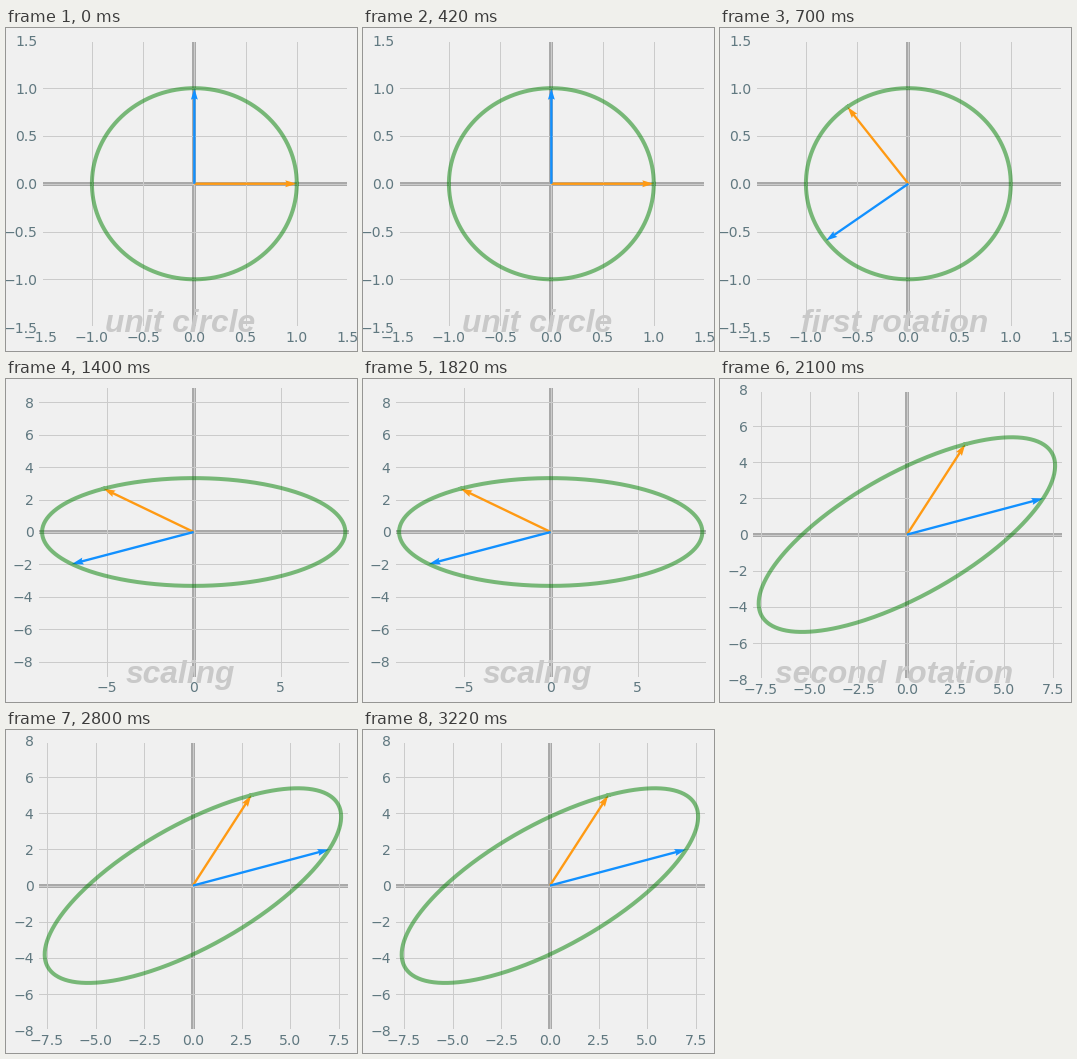
A matplotlib script for the animation above (3500 ms loop, 351x323 px).

```python
import numpy as np
import matplotlib.pyplot as plt
from matplotlib.animation import FuncAnimation
from matplotlib.ticker import MultipleLocator

W, H, DPI = 351, 323, 72
BG = "#f0f0f0"
ORANGE, BLUE = "#FF9A13", "#1190FF"

plt.rcParams.update({
    "font.family": "DejaVu Sans",
    "font.size": 14,
    "figure.facecolor": BG,
    "axes.facecolor": BG,
    "axes.edgecolor": BG,
    "axes.linewidth": 3,
    "axes.grid": True,
    "axes.axisbelow": True,
    "grid.color": "#cbcbcb",
    "grid.linewidth": 1,
    "lines.linewidth": 4,
    "xtick.major.size": 0,
    "ytick.major.size": 0,
    "xtick.labelcolor": "#607880",
    "ytick.labelcolor": "#607880",
})

# Singular value decomposition of A with a fixed choice of signs
A = np.array([[3, 7], [5, 2]])
U, sigma, _ = np.linalg.svd(A)
U = U * np.array([-np.sign(U[0, 0]), np.sign(U[1, 1])])
D = np.diag(sigma)
Vt = np.linalg.inv(D) @ U.T @ A

# Views: limit, x step, y step, box in pixels (left, top, right, bottom)
UNIT = (1.5, 0.5, 0.5, (34.7, 12.4, 342, 299.1))
WIDE = (9, 5, 2, (31.1, 7.3, 344.3, 298.7))
TILT = (8, 2.5, 2, (31.2, 11, 342.6, 300.2))

STEPS = [
    ("unit circle", np.eye(2), UNIT),
    ("first rotation", Vt, UNIT),
    ("scaling", D @ Vt, WIDE),
    ("second rotation", A, TILT),
    ("", A, TILT),
]

angle = np.linspace(0, 2 * np.pi, 400)
circle = np.array([np.cos(angle), np.sin(angle)])

fig = plt.figure(figsize=(W / DPI, H / DPI), dpi=DPI)
ax = fig.add_axes([0.1, 0.1, 0.8, 0.8])
caption = fig.text(174.5 / W, 1 - 304 / H, "", ha="center", va="baseline",
                   family="Liberation Sans", size=31.8, weight="bold",
                   style="italic", color="#c9c9c9")


def draw(i):
    title, M, (lim, xstep, ystep, box) = STEPS[i]
    left, top, right, bottom = box
    ax.clear()
    ax.set_position([left / W, 1 - bottom / H,
                     (right - left) / W, (bottom - top) / H])
    ax.axvline(0, color="#A9A9A9", zorder=0)
    ax.axhline(0, color="#A9A9A9", zorder=0)
    ax.plot(*(M @ circle), color="g", alpha=0.5)
    ax.quiver([0, 0], [0, 0], M[0], M[1], color=[ORANGE, BLUE],
              angles="xy", scale_units="xy", scale=1)
    ax.set(xlim=(-lim, lim), ylim=(-lim, lim))
    ax.xaxis.set_major_locator(MultipleLocator(xstep))
    ax.yaxis.set_major_locator(MultipleLocator(ystep))
    caption.set_text(title)
    return ax, caption


anim = FuncAnimation(fig, draw, frames=len(STEPS), interval=700,
                     repeat=True, repeat_delay=0, blit=False)
plt.show()
```
